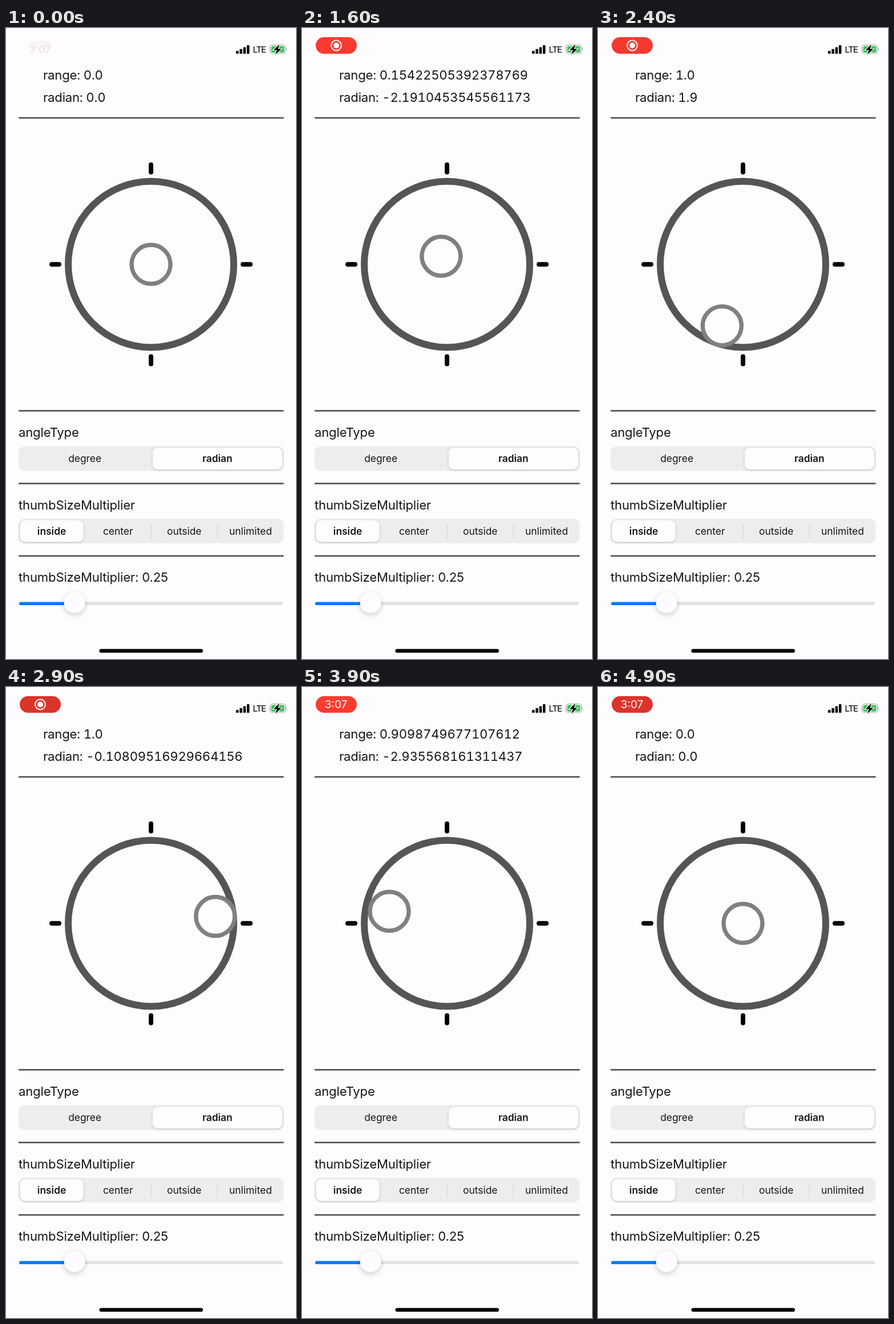
These frames come from a looping animation (508 by 1102 pixels, 5000 ms). An HTML page:

```html
<!DOCTYPE html>
<html lang="en">
<head>
<meta charset="utf-8">
<title>Joystick demo</title>
<style>
  html, body { margin: 0; width: 100%; height: 100%; overflow: hidden; background: #fefcff; }
  svg { display: block; width: 508px; height: 1102px; font: 22.1px Inter, sans-serif; fill: #161518; }
  .label { letter-spacing: -.17px; }
  .value { letter-spacing: -.2px; font-variant-numeric: tabular-nums; }
  .segment { font-size: 17.4px; text-anchor: middle; }
  .selected { font-weight: 600; }
  .time { font-size: 19px; text-anchor: middle; }
  .rule { stroke: #4a484c; stroke-width: 2.5; }
  .tick { stroke: #000; stroke-width: 8; stroke-linecap: round; }
  .track { fill: #eeecef; }
  .chip { fill: #fefcff; filter: drop-shadow(0 1px 2px #0003); }
  .divider { stroke: #d6d5d8; stroke-width: 1.3; }
</style>
</head>
<body>
<svg viewBox="0 0 508 1102">
  <text id="clock" class="time" x="59.5" y="43.5">3:07</text>
  <g id="pill">
    <rect id="pillBack" x="24" y="16" width="72" height="29" rx="14.5"/>
    <g id="recordIcon">
      <circle cx="60" cy="30.5" r="8.9" fill="none" stroke="#fff" stroke-width="2"/>
      <circle cx="60" cy="30.5" r="5" fill="#fff"/>
    </g>
    <text id="pillTime" class="time" x="59.5" y="37" fill="#fff">3:07</text>
  </g>

  <g id="signal" fill="#000"></g>
  <text x="432.5" y="43" font-size="14.6" font-weight="500" letter-spacing="-1">LTE</text>
  <rect x="462.5" y="29.5" width="27" height="15.5" rx="4.5" fill="none" stroke="#a3a2a5" stroke-width="1.2"/>
  <rect x="464.5" y="31.5" width="23" height="11.5" rx="2.8" fill="#35c759"/>
  <path d="M491 35q2.4 2.2 0 4.6z" fill="#a3a2a5"/>
  <path d="M479 28.5l-10.5 10h6l-2.5 8 10.5-10h-6z" fill="#000" stroke="#fefcff" stroke-width="2.2" paint-order="stroke"/>

  <text class="value" id="rangeText" x="65" y="90"/>
  <text class="value" id="radianText" x="65" y="128.5"/>
  <g class="label">
    <text x="22" y="714">angleType</text>
    <text x="22" y="840.5">thumbSizeMultiplier</text>
    <text x="22" y="967">thumbSizeMultiplier: 0.25</text>
  </g>
  <path class="rule" d="M22 157H486.5M22 668.5H486.5M22 795.5H486.5M22 922H486.5"/>

  <g id="ticks"></g>
  <circle cx="254" cy="412.8" r="145" fill="none" stroke="#555457" stroke-width="12"/>
  <circle id="thumb" r="34" fill="#fefcff" stroke="#807f82" stroke-width="7.4"/>

  <g id="controls"></g>
  <rect x="23" y="1002.5" width="462" height="5.5" rx="2.7" fill="#e3e1e4"/>
  <rect x="23" y="1002.5" width="97" height="5.5" rx="2.7" fill="#007aff"/>
  <circle cx="120" cy="1003.5" r="18.5" fill="#fefcff" style="filter: drop-shadow(0 3px 5px #0003)"/>
  <rect x="163.5" y="1084.5" width="181.5" height="6.5" rx="3.2" fill="#000"/>
</svg>
<script>
const LOOP = 5000, STEP = 100, REACH = 113.4, CENTER = { x: 254, y: 412.8 };

// Main poses of the drag; the thumb rests at the center outside them
const drag = [
  { t: 1500, range: 0, radian: -2 },
  { t: 1600, range: 0.15422505392378769, radian: -2.1910453545561173 },
  { t: 2000, range: 0.7916416038921443, radian: -2.8532690603648105 },
  { t: 2400, range: 1, radian: 1.9 },
  { t: 2900, range: 1, radian: -0.10809516929664156 },
  { t: 3500, range: 1, radian: -2.214056079362666 },
  { t: 3800, range: 1, radian: 2.93 },
  { t: 4300, range: 0.5493748385538058, radian: -1.2650995778388407 },
  { t: 4600, range: 0.34, radian: 1.6 },
  { t: 4700, range: 0, radian: 1.6 }
];

const $ = id => document.getElementById(id);
const clamp = x => Math.min(1, Math.max(0, x));
const mix = (a, b, f) => a + (b - a) * f;
const decimal = x => Number.isInteger(x) ? x.toFixed(1) : String(x);

function wrap(angle) {
  if (angle > Math.PI) return angle - 2 * Math.PI;
  return angle < -Math.PI ? angle + 2 * Math.PI : angle;
}

function segments(y, labels, selected) {
  const left = 22, width = 464.5 / labels.length;
  let svg = `<rect class="track" x="${left}" y="${y}" width="464.5" height="43" rx="11"/>`;
  labels.forEach((label, i) => {
    const x = left + i * width, on = i === selected;
    if (on) svg += `<rect class="chip" x="${x + 2.5}" y="${y + 2.5}" width="${width - 5}" height="38" rx="9"/>`;
    else if (i > selected + 1) svg += `<path class="divider" d="M${x} ${y + 9}v26"/>`;
    svg += `<text class="segment ${on ? "selected" : ""}" x="${x + width / 2}" y="${y + 27.8}">${label}</text>`;
  });
  return svg;
}

function poseAt(t) {
  const i = drag.findIndex(pose => pose.t > t);
  if (i < 1) return { range: 0, radian: 0 };
  const a = drag[i - 1], b = drag[i], f = (t - a.t) / (b.t - a.t);
  const range = mix(a.range, b.range, f);
  return { range, radian: range && wrap(a.radian + wrap(b.radian - a.radian) * f) };
}

function drawPill(t) {
  const shown = clamp(0.04 + t / 350);
  const glow = Math.sqrt((1 + Math.cos((t - 3950) / 1000 * Math.PI)) / 2);
  const time = clamp((t - 3100) / 200);
  $("pill").setAttribute("opacity", shown);
  $("pill").setAttribute("transform", `translate(60 30.5) scale(${mix(0.5, 1, shown)}) translate(-60 -30.5)`);
  $("pillBack").setAttribute("fill", `rgb(${mix(216, 255, glow)},${mix(51, 59, glow)},${mix(43, 48, glow)})`);
  $("recordIcon").setAttribute("opacity", 1 - time);
  $("pillTime").setAttribute("opacity", time);
  $("clock").setAttribute("opacity", 0.1 * clamp(1 - t / 150));
}

function draw(now) {
  const t = Math.floor(now % LOOP / STEP) * STEP;
  const { range, radian } = poseAt(t);
  $("thumb").setAttribute("cx", CENTER.x + REACH * range * Math.cos(radian));
  $("thumb").setAttribute("cy", CENTER.y + REACH * range * Math.sin(radian));
  $("rangeText").textContent = "range: " + decimal(range);
  $("radianText").textContent = "radian: " + decimal(radian);
  drawPill(t);
  requestAnimationFrame(draw);
}

for (let i = 0; i < 4; i++) {
  const height = 5 + 3.3 * i;
  $("signal").innerHTML += `<rect x="${403 + 6.3 * i}" y="${45 - height}" width="4.5" height="${height}" rx="1"/>`;
  $("ticks").innerHTML += `<path class="tick" d="M415 412.8h13" transform="rotate(${90 * i} 254 412.8)"/>`;
}
$("controls").innerHTML = segments(730.5, ["degree", "radian"], 1)
  + segments(857, ["inside", "center", "outside", "unlimited"], 0);
draw(0);
</script>
</body>
</html>
```
